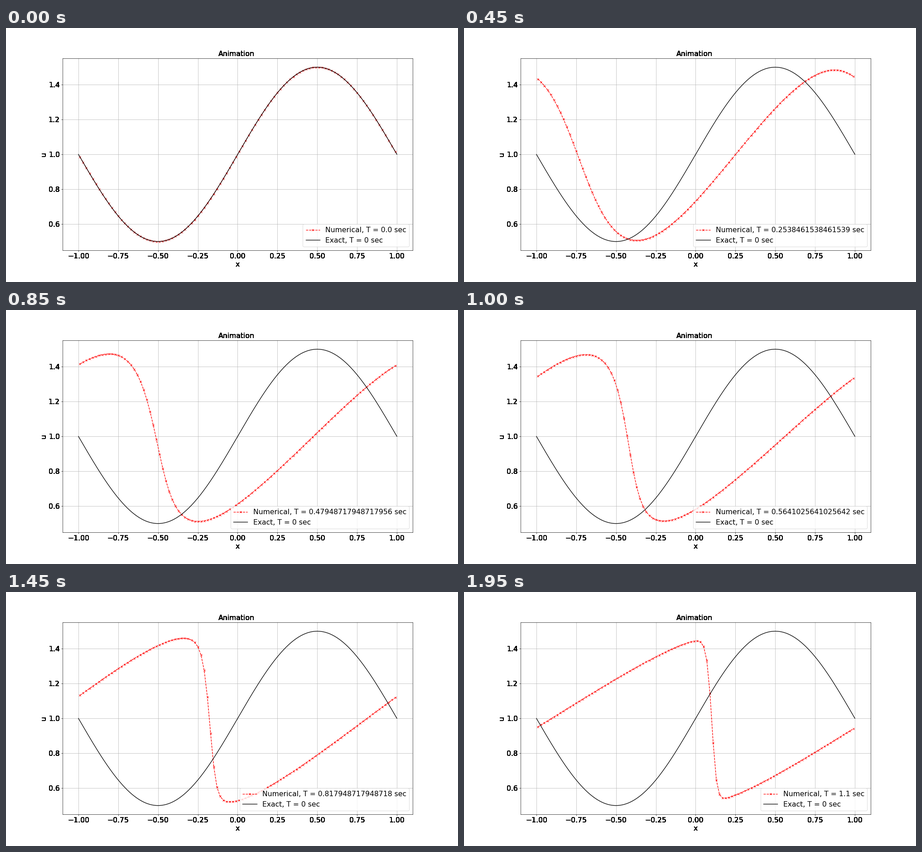
A matplotlib script that plays this animation: 998 by 561 pixels, repeating every 2000 ms.

```python
import numpy as np
import matplotlib.pyplot as plt
from matplotlib.animation import FuncAnimation

WIDTH, HEIGHT = 998, 561
DPI = 62.4
FRAMES, INTERVAL = 40, 50
CELLS, STEPS = 100, 200
T_END = 1.1
EPS = 1e-6  # keeps the pixel size from rounding down

plt.rcParams.update({"font.family": "DejaVu Sans", "font.size": 18})


def initial(x):
    return 1 + 0.5 * np.sin(np.pi * x)


def solve(t):
    """Periodic Burgers equation, conservative upwind, fixed step count."""
    u = initial(x_cells)
    ratio = t / STEPS / dx
    for _ in range(STEPS):
        flux = u * u / 2
        u = u - ratio * (flux - np.roll(flux, 1))
    return u


def thicken(text, copies=10):
    """Stack copies of a label so that its soft edges turn solid."""
    for _ in range(copies):
        fig.text(*text.get_position(), text.get_text(),
                 transform=text.get_transform(),
                 ha=text.get_ha(), va=text.get_va(),
                 rotation=text.get_rotation(),
                 rotation_mode=text.get_rotation_mode(),
                 fontsize=text.get_fontsize())


dx = 2 / CELLS
x_cells = -1 + dx * (np.arange(CELLS) + 0.5)
x_exact = np.linspace(-1, 1, 201)
times = np.linspace(0, T_END, FRAMES)
states = [solve(t) for t in times]

fig = plt.figure(figsize=((WIDTH + EPS) / DPI, (HEIGHT + EPS) / DPI),
                 dpi=DPI, facecolor="white")
ax = fig.add_axes([0.125, 0.125, 0.775, 0.755])
ax.set(xlim=(-1.1, 1.1), ylim=(0.45, 1.55), xlabel="x", ylabel="u")
ax.set_title("Animation", fontsize=18, x=0.4968)
ax.set_xticks(np.linspace(-1, 1, 9))
ax.set_yticks([0.6, 0.8, 1.0, 1.2, 1.4])
ax.grid(True)

numeric, = ax.plot(x_cells, states[0], "r--x", markersize=4,
                   label="Numerical, T = 0.0 sec")
ax.plot(x_exact, initial(x_exact), "k", label="Exact, T = 0 sec")
legend = ax.legend(loc="lower right")
caption = legend.get_texts()[0]

fig.canvas.draw()
for label in [ax.title, ax.xaxis.label, ax.yaxis.label,
              *ax.get_xticklabels(), *ax.get_yticklabels()]:
    thicken(label)


def update(i):
    numeric.set_ydata(states[i])
    caption.set_text(f"Numerical, T = {times[i]} sec")
    return numeric, legend


anim = FuncAnimation(fig, update, frames=FRAMES, interval=INTERVAL,
                     repeat=True, repeat_delay=0)
plt.show()
```
